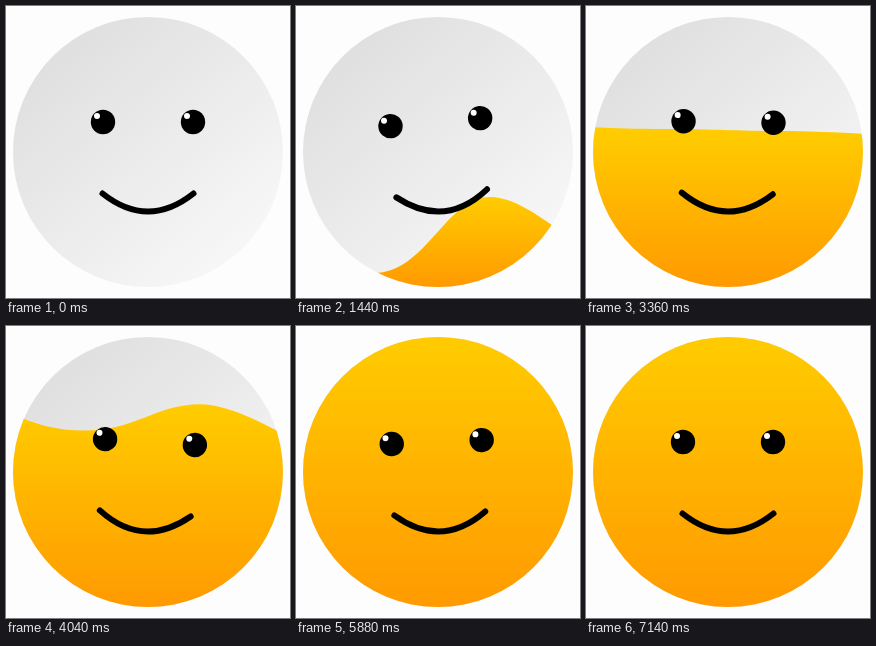
Recreate the animation shown at these times as an HTML page. Size 284x292 px, loop 7160 ms.

```html
<!DOCTYPE html>
<html lang="en">
<head>
<meta charset="utf-8">
<title>Smiley filling up</title>
<style>
  html, body { margin: 0; width: 100%; height: 100%; overflow: hidden; background: #fdfdfd; }
  svg { display: block; width: 100vw; height: 100vh; }
</style>
</head>
<body>
<svg viewBox="0 0 284 292">
  <defs>
    <linearGradient id="grey" gradientUnits="userSpaceOnUse" x1="55" y1="50" x2="230" y2="250">
      <stop offset="0" stop-color="#e0e0e0"/>
      <stop offset="1" stop-color="#f7f7f7"/>
    </linearGradient>
    <linearGradient id="juice" gradientUnits="userSpaceOnUse" x1="0" x2="0" y1="11" y2="281">
      <stop offset="0" stop-color="#ffcc00"/>
      <stop offset="1" stop-color="#ff9a00"/>
    </linearGradient>
    <clipPath id="head"><circle cx="142" cy="146" r="135"/></clipPath>
    <g id="eye">
      <circle r="12.2"/>
      <circle cx="-6" cy="-6" r="3" fill="#fff"/>
    </g>
  </defs>
  <circle cx="142" cy="146" r="135" fill="url(#grey)"/>
  <path id="liquid" fill="url(#juice)" clip-path="url(#head)"/>
  <g id="face">
    <use href="#eye" x="97" y="116"/>
    <use href="#eye" x="187" y="116"/>
    <path d="M96.5 187.5Q142 223.5 187.5 187.5" fill="none" stroke="#000" stroke-width="6" stroke-linecap="round"/>
  </g>
</svg>
<script>
const LOOP = 7160;
const SWING = LOOP / 8;

// time, then surface heights: left edge, trough, crest, right edge
const surface = [
  [0, 330, 330, 283, 305],
  [720, 310, 310, 232, 258],
  [1440, 272, 267, 191, 240],
  [2160, 210, 222, 163, 202],
  [2660, 163, 179, 147, 187],
  [3360, 121, 123, 125, 128],
  [4320, 70, 97, 59, 104],
  [4700, 50, 79, 40, 86],
  [5040, 25, 55, 13, 58],
  [5400, -10, -10, -20, -10]
];

// swing phase, tilt in degrees
const tilt = [[0, 0], [0.25, 4.7], [0.49, 4.7], [0.612, -5.1], [0.8, 2], [0.95, 0], [1, 0]];

const linear = u => u;
const smooth = u => (1 - Math.cos(Math.PI * u)) / 2;

function sample(keys, at, ease) {
  const last = keys[keys.length - 1];
  if (at >= last[0]) return last.slice(1);
  const i = keys.findIndex(key => key[0] > at);
  const from = keys[i - 1], to = keys[i];
  const u = ease((at - from[0]) / (to[0] - from[0]));
  return from.slice(1).map((value, k) => value + (to[k + 1] - value) * u);
}

const liquid = document.getElementById('liquid');
const juice = document.getElementById('juice');
const face = document.getElementById('face');

function render(time) {
  const [left, trough, crest, right] = sample(surface, time, linear);
  const shoulder = right - (right - crest) * 0.35;
  liquid.setAttribute('d',
    `M0 ${left}C24 ${left + (trough - left) * 0.6} 48 ${trough} 78 ${trough}` +
    `C130 ${trough} 150 ${crest} 194 ${crest}` +
    `C224 ${crest} 260 ${shoulder} 284 ${right}V292H0Z`);
  juice.setAttribute('y1', Math.max(11, Math.min(crest, 270)));

  const [angle] = sample(tilt, time % SWING / SWING, smooth);
  face.setAttribute('transform', `rotate(${angle} 142 146)`);
}

let start;
function tick(now) {
  start ??= now;
  render(Math.max(0, now - start) % LOOP);
  requestAnimationFrame(tick);
}
render(0);
requestAnimationFrame(tick);
</script>
</body>
</html>
```
